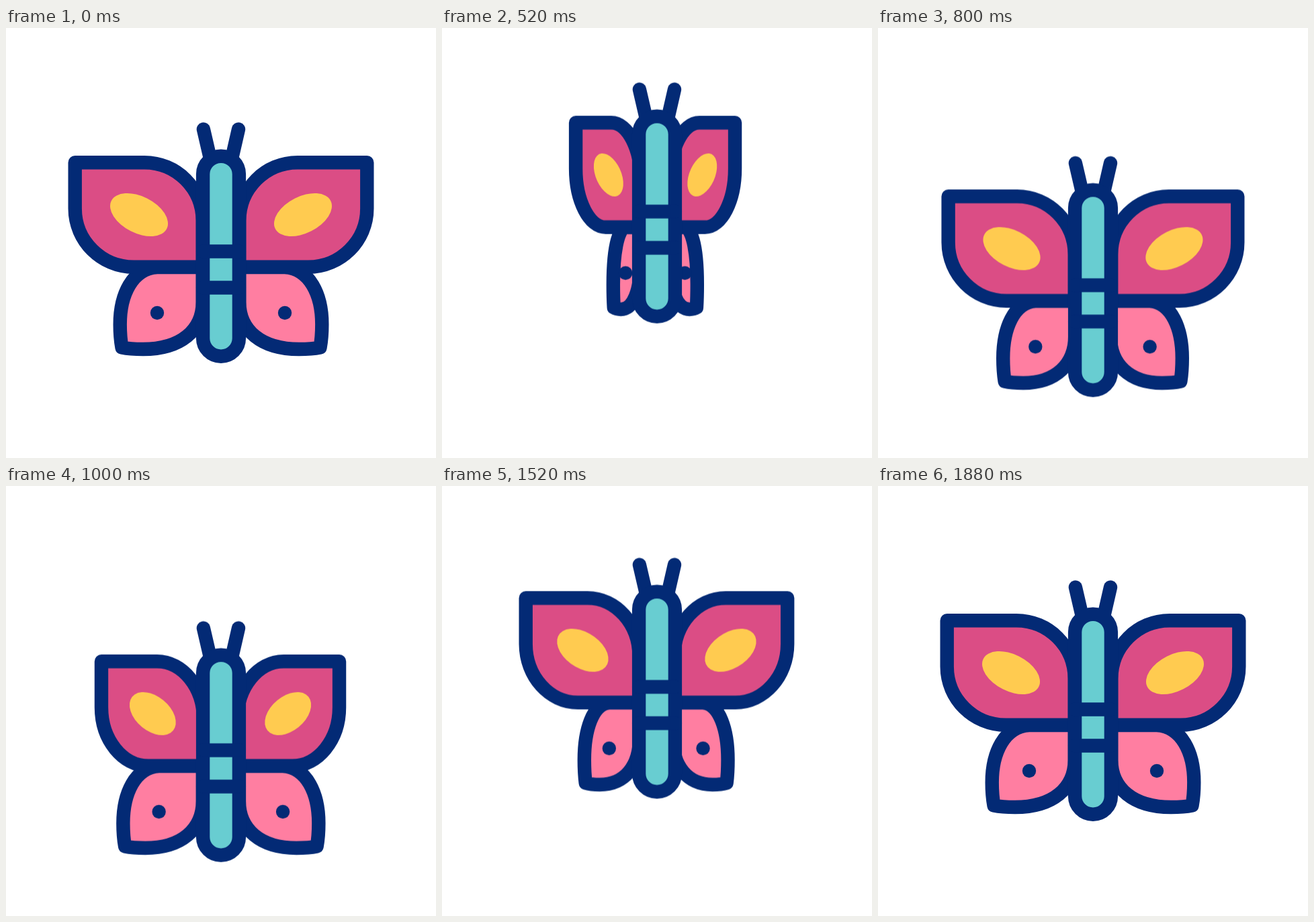
An HTML page without scripts for the animation above (2000 ms loop, 640x640 px).

```html
<!DOCTYPE html>
<html lang="en">
<head>
<meta charset="utf-8">
<title>Butterfly</title>
<style>
  @property --top { syntax: "<number>"; inherits: true; initial-value: 1; }
  @property --low { syntax: "<number>"; inherits: true; initial-value: 1; }

  html, body { margin: 0; width: 100%; height: 100%; overflow: hidden; background: #fff; }

  svg {
    display: block;
    animation: 2s cubic-bezier(.4, 0, .6, 1) infinite;
    animation-name: flap-top, flap-low;
  }

  .line {
    stroke: #032a75;
    stroke-width: 20.4px;
    stroke-linecap: round;
    stroke-linejoin: round;
    vector-effect: non-scaling-stroke;
  }

  /* Wings fold towards a hinge near the body; outlines keep their weight. */
  .top { transform-origin: var(--top-hinge) 0; transform: scaleX(var(--top)); }
  .low { transform-origin: var(--low-hinge) 0; transform: scaleX(var(--low)); }
  .right { --top-hinge: 330px; --low-hinge: 335px; }
  .left { --top-hinge: 340px; --low-hinge: 343px; }

  .fly { animation: fly 2s cubic-bezier(.4, 0, .6, 1) infinite; }

  @keyframes fly {
    0%, 93.8%, 100% { transform: translateY(0); }
    20% { transform: translateY(-76px); }
    46.1% { transform: translateY(67px); }
    70% { transform: translateY(-39px); }
  }
  @keyframes flap-top {
    0%, 42%, 82%, 100% { --top: 1; }
    20%, 62% { --top: .416; }
  }
  @keyframes flap-low {
    0%, 3.4%, 47%, 85.3%, 100% { --low: 1; }
    23.5%, 66.4% { --low: .314; }
  }
</style>
</head>
<body>
<svg width="640" height="640" viewBox="0 0 640 640">
  <defs>
    <g id="wing">
      <path class="line low" fill="#ff7ea1" d="M347.3 356H415C452 358 470.3 397 470.3 441C470.3 455 469.3 466 467.5 475.5C458 477.5 447 478 436 478C380 478 347.3 450 347.3 408Z"/>
      <path class="line low" d="M415 424h.01"/>
      <path class="line top" fill="#db4d85" d="M347.3 355.8V287C347.3 239 386 200.2 434 200.2H537.3V268.8C537.3 316.8 498 355.8 450 355.8Z"/>
      <g class="top">
        <ellipse fill="#ffcb50" rx="46.2" ry="27.2" transform="translate(442 278) rotate(-26.8)"/>
      </g>
    </g>
  </defs>

  <g class="fly">
    <g transform="matrix(-1 0 0 1 640 0)"><use class="left" href="#wing"/></g>
    <use class="right" href="#wing"/>
    <path class="line" fill="none" d="M293.9 150.7L303 190M346 150.7L337 190"/>
    <rect class="line" fill="#68cdd1" x="293.1" y="190.7" width="53.8" height="298" rx="26.9"/>
    <path class="line" d="M293.1 332.5H346.9M293.1 386.5H346.9"/>
  </g>
</svg>
</body>
</html>
```
